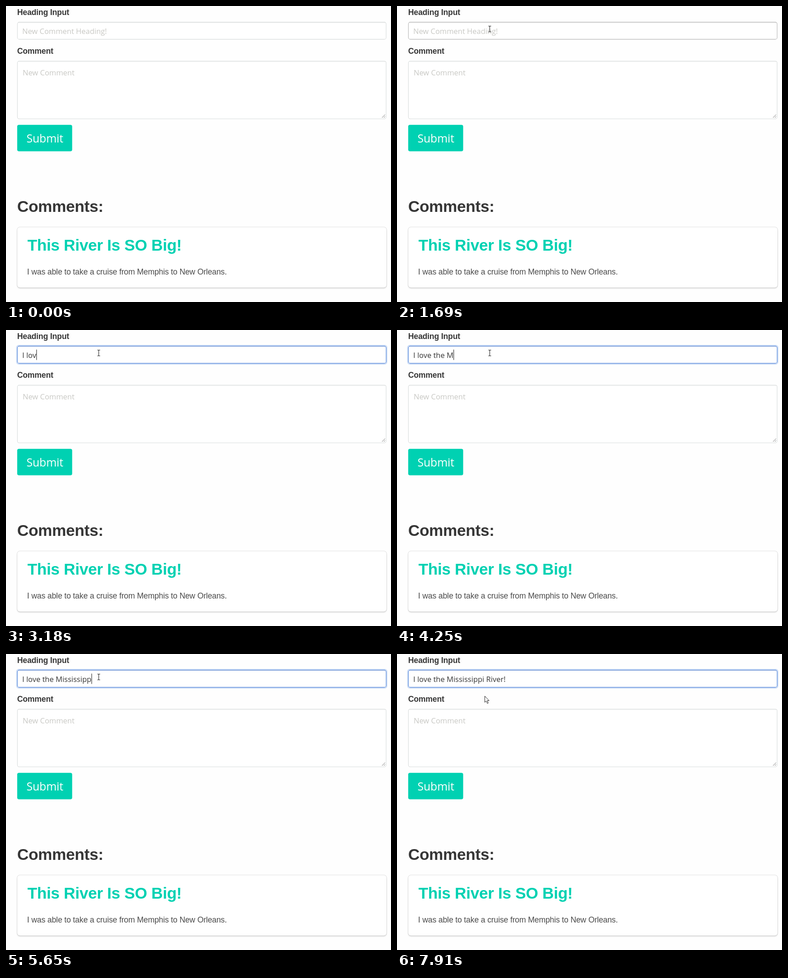
An HTML page that plays this animation: 853x657 px, repeating every 7.99 s.

```html
<!DOCTYPE html>
<html lang="en">
<head>
<meta charset="utf-8">
<title>Comment form</title>
<style>
  html, body { margin: 0; width: 100%; height: 100%; overflow: hidden; background: #fefefe; }
  svg, #card { position: absolute; }
  svg { left: 0; top: 0; }
  #card {
    left: 25px; top: 491px; width: 818px; height: 134px; border-radius: 6px; background: #fff;
    box-shadow: 0 2px 3px rgba(10, 10, 10, .13), 0 0 0 1px rgba(10, 10, 10, .11);
  }
  .field { fill: #fff; stroke: #d8dcdc; stroke-width: 1.1px; }
  .field.hover { stroke: #b5b5b5; }
  .field.focus { stroke: #4a7fd8; }
  text { font: 17.6px "Liberation Sans", Arial, sans-serif; fill: #4a4a4a; letter-spacing: -.0085em; }
  .bold { font-weight: 700; fill: #363636; }
  .title { font-size: 35.2px; }
  .ui { font: 16.5px "Open Sans", "Segoe UI", sans-serif; fill: #363636; letter-spacing: 0; }
  .hint { fill: #c8c8c4; }
</style>
</head>
<body>
<div id="card"></div>
<svg width="853" height="657">
  <rect id="ring" x="23.6" y="34.2" width="820.2" height="41.4" rx="5" fill="none"
    stroke="#3273dc" stroke-opacity=".25" stroke-width="2.3"/>
  <rect class="field" id="heading" x="25.3" y="35.9" width="816.9" height="38" rx="4"/>
  <rect class="field" id="comment" x="25.3" y="122.3" width="816.9" height="128.2" rx="4"/>
  <path d="M27 37H841M27 123.4H841" stroke="#0a0a0a" stroke-opacity=".07"/>
  <path d="M833 248l7-7M837 248l3-3" stroke="#777" fill="none"/>
  <rect x="24.8" y="263.8" width="121.8" height="58.6" rx="4" fill="#00d1b2"/>

  <text class="bold" x="24.7" y="20">Heading Input</text>
  <text class="bold" x="24.7" y="106">Comment</text>
  <text class="ui hint" id="hint" x="36" y="62">New Comment Heading!</text>
  <text class="ui" id="typed" x="36" y="62" xml:space="preserve"></text>
  <text class="ui hint" x="37" y="153.5">New Comment</text>
  <text class="ui" x="86.2" y="302.5" text-anchor="middle" style="font-size:24.6px;fill:#fff">Submit</text>
  <text class="bold title" x="24.8" y="457">Comments:</text>
  <text class="bold title" x="47.5" y="543.3" style="fill:#00d1b2">This River Is SO Big!</text>
  <text x="46.8" y="595.7">I was able to take a cruise from Memphis to New Orleans.</text>

  <rect id="caret" y="43.5" width="1.1" height="23" fill="#222"/>
  <path id="arrow" d="M0 0V13.7L3.2 10.8 5.6 16.3 7.8 15.3 5.4 10H9.6Z" fill="#fff" stroke="#222"/>
  <path id="beam" d="M-3-6.5H-1L0-5.5 1-6.5H3M0-5.5V5.5M-3 6.5H-1L0 5.5 1 6.5H3" fill="none" stroke="#222" stroke-width="1.1"/>
</svg>
<script>
  const LOOP = 7990, FOCUS = 2080, BLINK = 7680;
  const phrase = "I love the Mississippi River!";
  const keyTimes = [
    2540, 2700, 2860, 3020, 3180, 3410, 3560,
    3720, 3800, 3870, 3950,
    4250, 4410, 4540, 4670, 4800, 4930, 5060, 5190,
    5420, 5650, 5800, 5960, 6130, 6290, 6440,
    6670, 6750, 7130
  ];
  const [ring, heading, comment, hint, typed, caret, arrow, beam] =
    ["ring", "heading", "comment", "hint", "typed", "caret", "arrow", "beam"]
      .map(id => document.getElementById(id));
  const show = (node, on) => node.setAttribute("visibility", on ? "visible" : "hidden");

  // The pointer glides in with a slowing motion, rests, then leaves downwards.
  function pointer(t) {
    if (t >= 7910) return [194.5, 93.5];
    if (t >= 7830) return [200, 72];
    const step = Math.min(10, Math.floor((t - 920 + 4) / 77));
    const rest = (1 - step / 10) ** 2.42;
    return [205.5 + 95 * rest, 51 + 290 * rest];
  }

  function draw(t) {
    const visible = t >= 920, focused = t >= FOCUS;
    const [x, y] = pointer(t);
    const overHeading = visible && y > 36 && y < 74;
    const overComment = visible && y > 122 && y < 251;
    const overField = overHeading || overComment;
    for (const cursor of [arrow, beam]) cursor.setAttribute("transform", `translate(${x} ${y})`);
    show(arrow, visible && !overField);
    show(beam, overField);

    show(ring, focused);
    heading.classList.toggle("hover", overHeading);
    heading.classList.toggle("focus", focused);
    comment.classList.toggle("hover", overComment);

    const count = keyTimes.filter(k => k <= t).length;
    typed.textContent = phrase.slice(0, count);
    show(hint, !count);
    caret.setAttribute("x", 36.2 + (count ? typed.getComputedTextLength() : 0));
    show(caret, focused && t < BLINK);
  }

  function tick() {
    draw(performance.now() % LOOP);
    requestAnimationFrame(tick);
  }
  tick();
</script>
</body>
</html>
```
